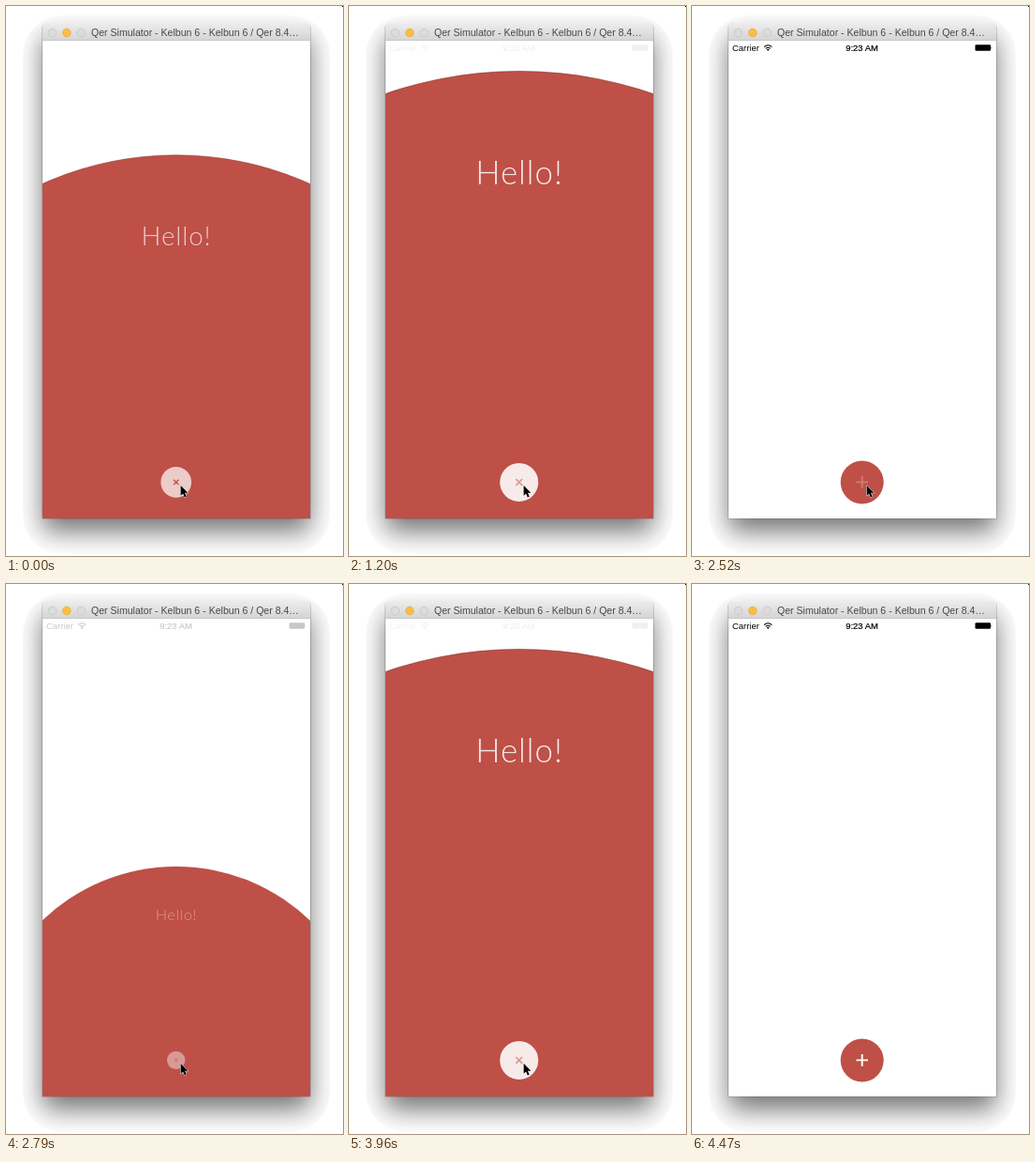
An HTML page for the animation above (5250 ms loop, 360x586 px).

```html
<!DOCTYPE html>
<html lang="en">
<head>
<meta charset="utf-8">
<title>Bubble transition</title>
<style>
  html, body { margin: 0; width: 100%; height: 100%; overflow: hidden; background: #fff; }
  .halo { position: absolute; left: 18px; top: 10px; width: 328px; height: 574px; border-radius: 42px; overflow: hidden; }
  .shadow {
    position: absolute; left: 21px; top: 9px; width: 286px; height: 527px; border-radius: 4px 4px 0 0;
    box-shadow: 0 14px 28px rgba(0, 0, 0, .55), 0 0 0 .6px rgba(0, 0, 0, .25);
  }
  svg { position: absolute; left: 0; top: 0; display: block; }
  text { font-family: "Liberation Sans", Arial, sans-serif; }
  .hello { font: 300 39px Lato, "Open Sans", sans-serif; letter-spacing: 1.2px; }
</style>
</head>
<body>
<div class="halo"><div class="shadow"></div></div>
<svg width="360" height="586" viewBox="0 0 360 586">
  <defs>
    <linearGradient id="bar" x2="0" y2="1">
      <stop stop-color="#ededed"/><stop offset="1" stop-color="#d4d4d4"/>
    </linearGradient>
    <clipPath id="screen"><rect x="39" y="37" width="286" height="509"/></clipPath>
    <g id="status" fill="currentColor" font-size="9.45">
      <text x="43" y="48">Carrier</text>
      <text x="181.5" y="48" text-anchor="middle" stroke="currentColor" stroke-width=".2">9:23 AM</text>
      <g fill="none" stroke="currentColor" stroke-width="1.1">
        <path d="M77 43.6Q81.2 39.8 85.4 43.6M78.7 45.4Q81.2 43.2 83.7 45.4"/>
      </g>
      <path d="M79.8 46.4Q81.2 45.3 82.6 46.4L81.2 48Z"/>
      <rect x="302.5" y="41.3" width="16.6" height="6.4" rx="1.2"/>
      <path d="M319.7 43.2q1.3 1.3 0 2.6Z"/>
    </g>
  </defs>

  <path d="M39 37V22q0-4 4-4H321q4 0 4 4V37Z" fill="url(#bar)"/>
  <path d="M39 36.7H325" stroke="#b9b9b9" stroke-width=".6"/>
  <g fill="#dcdcdc" stroke="#c2c2c2" stroke-width=".7">
    <circle cx="49.5" cy="28.5" r="4.3"/>
    <circle cx="64.8" cy="28.5" r="4.3" fill="#fdbd41" stroke="#e2a63a"/>
    <circle cx="80.2" cy="28.5" r="4.3"/>
  </g>
  <text x="91" y="32" font-size="10.57" fill="#484848">Qer Simulator - Kelbun 6 - Kelbun 6 / Qer 8.4…</text>

  <g clip-path="url(#screen)">
    <rect x="39" y="37" width="286" height="509" fill="#fff"/>
    <g transform="translate(181.7 507.4)">
      <circle r="23" fill="#be5047"/>
      <path id="plus" d="M-6.3 0H6.3M0-6.3V6.3" stroke="#fff" stroke-width="1.9"/>
      <circle id="bubble" fill="#be5047" stroke="#8c2f28" stroke-width=".6"/>
      <g id="page">
        <text class="hello" x=".4" y="-355.4" fill="#fff" text-anchor="middle">Hello!</text>
        <circle r="23" fill="#fff"/>
        <path id="cross" d="M-3.8-3.8L3.8 3.8M3.8-3.8L-3.8 3.8" stroke="#be5047" stroke-width="1.9"/>
      </g>
    </g>
    <use id="light" href="#status" color="#fff"/>
    <use id="dark" href="#status" color="#000"/>
  </g>

  <path id="cursor" transform="translate(186.6 510.8)" d="M0 0V11L2.5 8.7 4.2 12.7 6.1 11.9 4.4 8H7.8Z"
    stroke="#fff" stroke-width="1" stroke-linejoin="round" paint-order="stroke"/>
  <rect x="359" width="1" height="1"/>
</svg>
<script>
const LOOP = 5250, STEP = 30, DURATION = 410, RADIUS = 491;
const moves = [[-257, true], [1106, false], [2604, true], [3866, false]]; // start, opening
const presses = [[-340, -257], [1050, 1106], [2520, 2604], [3780, 3866]]; // down, up
const hidden = [[1800, 2520], [4470, LOOP]]; // cursor away

const [plus, bubble, page, cross, light, dark, cursor] =
  ["plus", "bubble", "page", "cross", "light", "dark", "cursor"].map(id => document.getElementById(id));

const clamp = x => Math.min(1, Math.max(0, x));
const latest = (list, t) => list.filter(([start]) => start <= t).pop();

// cubic-bezier(.42, 0, .58, 1)
function ease(x) {
  x = clamp(x);
  let lo = 0, hi = 1;
  for (let i = 0; i < 24; i++) {
    const u = (lo + hi) / 2, v = 1 - u;
    if (1.26 * u * v * v + 1.74 * u * u * v + u * u * u < x) lo = u; else hi = u;
  }
  return lo * lo * (3 - 2 * lo);
}

function draw(t) {
  const [start, opening] = latest(moves, t);
  const toward = (p, up) => up ? p : 1 - p;
  const scale = toward(ease((t - start) / DURATION), opening);
  const black = toward(ease((t - start - 64) / 180), !opening);
  const [, up] = latest(presses, t);
  const mark = .25 + .75 * clamp((t - up) / 250);

  bubble.setAttribute("r", RADIUS * scale);
  bubble.setAttribute("stroke-opacity", clamp((scale - .4) * 2.5));
  bubble.style.display = page.style.display = scale > .001 ? "" : "none";
  page.setAttribute("transform", `scale(${scale})`);
  page.setAttribute("opacity", scale);
  plus.setAttribute("opacity", mark);
  cross.setAttribute("opacity", mark);
  light.setAttribute("opacity", 1 - black);
  dark.setAttribute("opacity", black);
  cursor.style.display = hidden.some(([a, b]) => t >= a && t < b) ? "none" : "";
}

const begin = performance.now();
function tick() {
  const t = (performance.now() - begin) % LOOP;
  draw(Math.floor(t / STEP) * STEP);
  requestAnimationFrame(tick);
}
tick();
</script>
</body>
</html>
```
